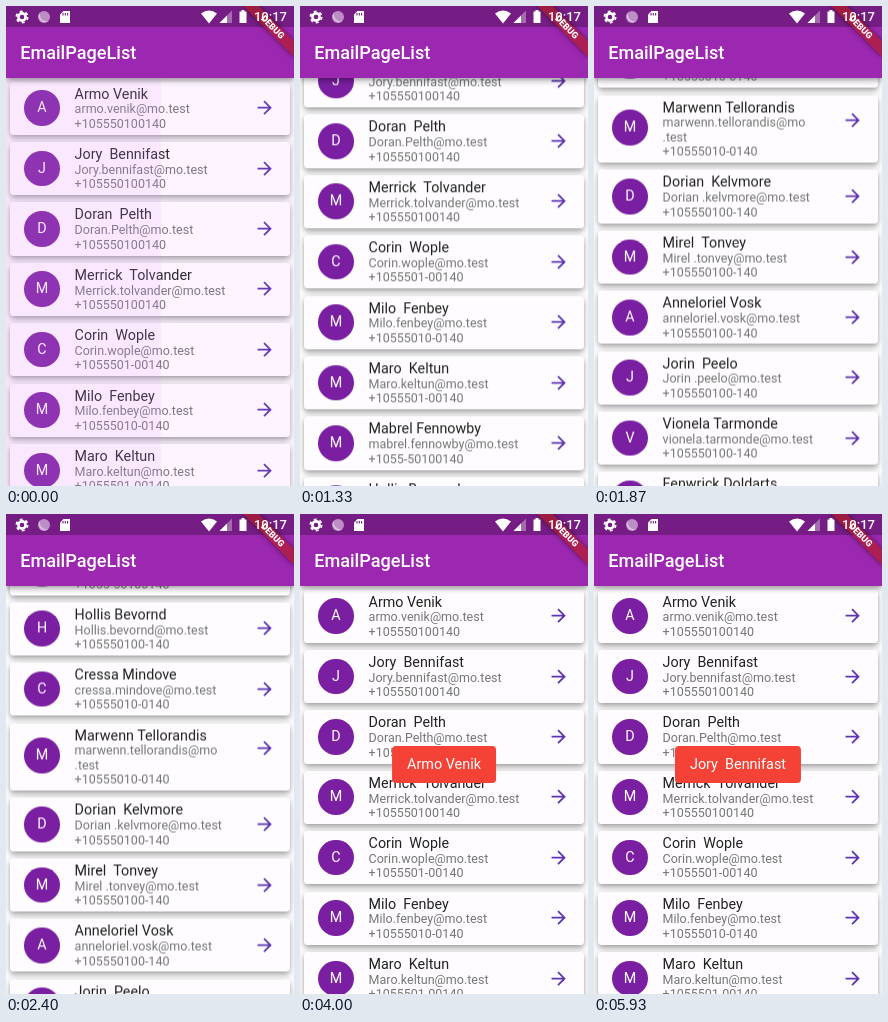
These frames come from a looping animation (288x480 px, 5.99 s). An HTML page:

```html
<!DOCTYPE html>
<html lang="en">
<head>
<meta charset="utf-8">
<title>EmailPageList</title>
<style>
  html, body { margin: 0; width: 100%; height: 100%; overflow: hidden; background: #fafafa; }
  body { font-family: Roboto, sans-serif; }
  div, svg { position: absolute; box-sizing: border-box; }
  #stage { left: 0; top: 0; width: 288px; height: 480px; overflow: hidden; background: #fafafa; }
  #list { left: 0; top: 0; width: 288px; will-change: transform; }
  .card {
    left: 3.6px; width: 280.8px; border-radius: 3.5px; background: #fefcff;
    box-shadow: 0 2px 4px -1px #0003, 0 4px 5px #00000026, 0 1px 8px #00000024;
  }
  .avatar {
    left: 14.6px; width: 35.6px; height: 35.6px; border-radius: 50%; background: #7b1fa2;
    color: #fff; font-size: 14.3px; line-height: 35.6px; text-align: center;
  }
  .text { left: 65px; top: 4.1px; white-space: pre; color: #757575; font-size: 12.5px; line-height: 14.5px; }
  .text b { display: block; font-weight: 400; font-size: 14.3px; line-height: 16.8px; color: #212121; }
  .arrow { left: 244.8px; width: 21.3px; height: 21.3px; fill: #5e35b1; }
  #glow { left: 0; top: 72px; }
  #tint { left: 0; top: 72px; width: 288px; height: 408px;
    background: linear-gradient(90deg, #e890ff2e 154px, #e890ff12 156px); }
  #bar { left: 0; top: 0; width: 288px; height: 71.5px; background: #9c27b0;
    box-shadow: 0 2px 4px -1px #0003, 0 4px 5px #00000024, 0 1px 8px #0000001f; }
  #title { left: 14.2px; top: 36px; font-size: 18.1px; line-height: 22px; font-weight: 500; color: #fff; }
  #status { left: 0; top: 0; width: 288px; height: 21.3px; background: #00000040; }
  #banner {
    left: 231.1px; top: 16px; width: 71px; height: 10.7px; transform: rotate(45deg);
    background: #b71c1ca0; box-shadow: 0 0 5px #0000007f; color: #fff;
    font-size: 9px; line-height: 10.7px; font-weight: 900; text-align: center;
  }
  #clock { right: 7px; top: 3px; font-size: 13px; line-height: 16px; font-weight: 500; color: #fff; }
  .toast {
    left: 50%; top: 232px; height: 37px; padding: 0 15px; transform: translateX(-50%);
    border-radius: 4px; background: #f44336; color: #fff; white-space: pre;
    font-size: 14.4px; line-height: 37px; opacity: 0;
  }
</style>
</head>
<body>
<div id="stage">
  <div id="list"></div>
  <svg id="glow" width="288" height="60"><ellipse cx="144" cy="0" rx="432" ry="0" fill="#9c27b0"/></svg>
  <div id="tint"></div>
  <div id="bar">
    <div id="title">EmailPageList</div>
    <div id="status"></div>
  </div>
  <div id="banner">DEBUG</div>
  <svg width="288" height="22" fill="#fff">
    <circle cx="16" cy="11" r="3.6" fill="none" stroke="#fff" stroke-width="2.6"/>
    <circle cx="16" cy="11" r="5.6" fill="none" stroke="#fff" stroke-width="1.8" stroke-dasharray="2.93"/>
    <circle cx="38" cy="11" r="6" fill="#bd8ec6"/>
    <path d="M34 6.6a6 6 0 0 0 8.4 8.4A7 7 0 0 1 34 6.6" fill="#d8bddd"/>
    <path d="M57.500 5H64V17H54V8.500Z"/>
    <path d="M57 7v2.500M59.300 7v2.500M61.600 7v2.500" stroke="#751d84" stroke-width="1.100"/>
    <path d="M195 7.500Q203 1.500 211 7.500L203 17.500Z"/>
    <path d="M226 4.500V17H213.500Z" opacity=".35"/>
    <path d="M221 9.500V17H213.500Z"/>
    <path d="M235.500 4h3v1.500h2V17h-7V5.500h2Z"/>
  </svg>
  <div id="clock">10:17</div>
  <div class="toast">Armo Venik</div>
  <div class="toast">Jory  Bennifast</div>
</div>
<script>
const LOOP = 5990, STEP = 1000 / 15;
const FIRST_CARD = 75.5, PITCH = 60.4, CARD = 53.3, LINE = 14.5;

// name, mailbox, position of the hyphen in the phone number (0 = none)
const contacts = [
  ['Armo Venik', 'armo.venik', 0],
  ['Jory  Bennifast', 'Jory.bennifast', 0],
  ['Doran  Pelth', 'Doran.Pelth', 0],
  ['Merrick  Tolvander', 'Merrick.tolvander', 0],
  ['Corin  Wople', 'Corin.wople', 7],
  ['Milo  Fenbey', 'Milo.fenbey', 8],
  ['Maro  Keltun', 'Maro.keltun', 7],
  ['Mabrel Fennowby', 'mabrel.fennowby', 4],
  ['Hollis Bevornd', 'Hollis.bevornd', 9],
  ['Cressa Mindove', 'cressa.mindove', 8],
  ['Marwenn Tellorandis', 'marwenn.tellorandis', 8],
  ['Dorian  Kelvmore', 'Dorian .kelvmore', 9],
  ['Mirel  Tonvey', 'Mirel .tonvey', 9],
  ['Anneloriel Vosk', 'anneloriel.vosk', 9],
  ['Jorin  Peelo', 'Jorin .peelo', 9],
  ['Vionela Tarmonde', 'vionela.tarmonde', 9],
  ['Fenwrick Doldarts', 'fenwrick.doldarts', 9],
];

function phone(hyphen) {
  const digits = '105550100140';
  return '+' + (hyphen ? digits.slice(0, hyphen) + '-' + digits.slice(hyphen) : digits);
}

function buildCards() {
  let y = FIRST_CARD;
  return contacts.map(([name, mailbox, hyphen]) => {
    const wraps = mailbox.length > 18;
    const extra = wraps ? LINE : 0;
    const html = `<div class="card" style="top:${y}px;height:${CARD + extra}px">
      <div class="avatar" style="top:${wraps ? 14.5 : 8.8}px">${name[0]}</div>
      <div class="text"><b>${name}</b>${mailbox}@mo${wraps ? '\n' : ''}.test\n${phone(hyphen)}</div>
      <svg class="arrow" style="top:${wraps ? 14.8 : 15.8}px" viewBox="0 0 24 24"><path d="M12 4l-1.410 1.410L16.170 11H4v2h12.170l-5.580 5.590L12 20l8-8z"/></svg>
    </div>`;
    y += PITCH + extra;
    return html;
  }).join('');
}

// Two flings: down the list and back to the top (time in ms, offset in px)
const scrollKeys = [
  [1200, 0], [1267, 20], [1333, 87.3], [1467, 325], [1600, 489.5], [1733, 558],
  [1867, 590.5], [2000, 604], [2133, 609], [2267, 590], [2333, 545],
  [2467, 385], [2600, 225], [2733, 95], [2867, 0],
];

const clamp = x => Math.min(1, Math.max(0, x));
const ramp = (t, from, to) => clamp((t - from) / (to - from));

// Monotone cubic interpolation through the keys
function along(keys, t) {
  const last = keys.length - 1;
  if (t <= keys[0][0]) return keys[0][1];
  if (t >= keys[last][0]) return keys[last][1];
  const slope = i => (keys[i + 1][1] - keys[i][1]) / (keys[i + 1][0] - keys[i][0]);
  const tangent = i => {
    if (i === 0 || i === last) return 0;
    const a = slope(i - 1), b = slope(i);
    return a * b <= 0 ? 0 : 2 * a * b / (a + b);
  };
  const i = keys.findIndex(key => key[0] > t) - 1;
  const [t0, y0] = keys[i], [t1, y1] = keys[i + 1];
  const d = t1 - t0, u = (t - t0) / d, v = 1 - u;
  return y0 * (1 + 2 * u) * v * v + y1 * u * u * (3 - 2 * u)
    + d * u * v * (tangent(i) * v - tangent(i + 1) * u);
}

const list = document.getElementById('list');
const glow = document.querySelector('#glow ellipse');
const tint = document.getElementById('tint');
const [toastA, toastB] = document.querySelectorAll('.toast');

function drawGlow(t) {
  const strength = ramp(t, 2800, 2933) * (1 - ramp(t, 2933, 3533)) ** 2;
  const scale = 0.777 * strength;
  glow.setAttribute('cy', (57.9 - 432) * scale);
  glow.setAttribute('ry', 432 * scale);
  glow.setAttribute('opacity', 0.23 * strength);
}

function draw(now) {
  const t = Math.floor((now % LOOP + 4) / STEP) * STEP;
  list.style.transform = `translateY(${-along(scrollKeys, t)}px)`;
  drawGlow(t);
  tint.style.opacity = 1 - ramp(t, 0, 600);
  toastA.style.opacity = ramp(t, 3600, 3867) * (1 - ramp(t, 4267, 4533));
  toastB.style.opacity = ramp(t, 4533, 4867);
}

list.innerHTML = buildCards();
const startTime = performance.now();
function tick() {
  draw(performance.now() - startTime);
  requestAnimationFrame(tick);
}
tick();
</script>
</body>
</html>
```
